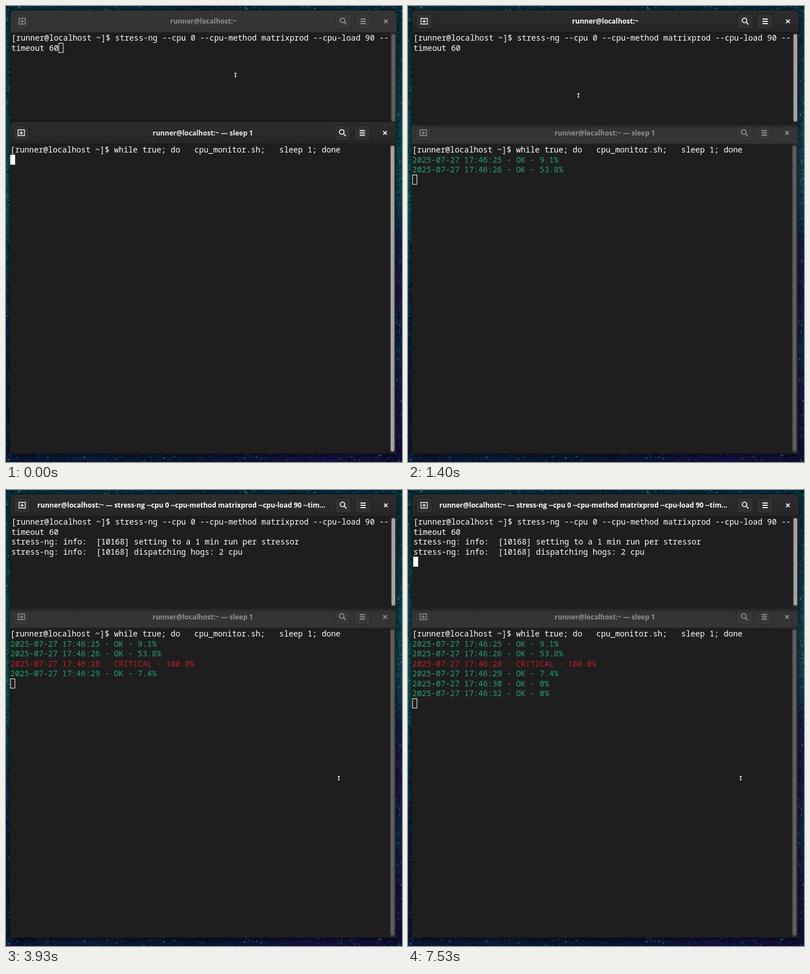
These frames come from a looping animation (698x803 px, 8 s). An HTML page with a canvas:

```html
<!DOCTYPE html>
<html lang="en">
<head>
<meta charset="utf-8">
<title>CPU monitor</title>
<style>
  html, body { margin: 0; width: 100%; height: 100%; overflow: hidden; background: #081428; }
  canvas { display: block; }
</style>
</head>
<body>
<canvas id="stage" width="698" height="803"></canvas>
<script>
const W = 698, H = 803, LOOP = 8000;
const ctx = document.getElementById('stage').getContext('2d');
const MONO = '13.87px "Noto Sans Mono", monospace';
const TITLE = 'bold 12px "Open Sans", sans-serif';
const CELL_W = 8.32, ROW_H = 17.5;
const WHITE = '#ffffff', GREEN = '#26a269', RED = '#c01c28';
const PROMPT = '[runner@localhost ~]$ ';
const HOME = 'runner@localhost:~';

const FOCUS_AT = 735, ENTER_AT = 2070, OUTPUT_AT = 2135, TITLE_AT = 2535;
const BLINKS = [1400, 2000, 2800, 3400, 3930, 4600, 5400, 6000, 7130, 7530];
const LOG = [
  [200, '25 - OK - 9.1%'],
  [1330, '26 - OK - 53.8%'],
  [2600, '28 - CRITICAL - 100.0%'],
  [3870, '29 - OK - 7.4%'],
  [5530, '30 - OK - 0%'],
  [7530, '32 - OK - 0%']
];
const POINTER = [
  [130, 404, 121], [700, 219, 87], [930, 219, 86], [1000, 219, 86],
  [1400, 300, 157], [2470, 300, 157], [2870, 586, 507]
];

const clamp = v => Math.max(0, Math.min(1, v));
const smooth = v => v * v * (3 - 2 * v);
const lerp = (a, b, p) => a + (b - a) * p;
const grey = (dim, lit, p) => {
  const v = Math.round(lerp(dim, lit, p));
  return `rgb(${v},${v},${v})`;
};

function random(seed) {
  return () => (seed = (seed * 16807) % 2147483647) / 2147483647;
}

function fillRound(c, x, y, w, h, r, color) {
  c.beginPath();
  c.roundRect(x, y, w, h, r);
  c.fillStyle = color;
  c.fill();
}

// Only the narrow margins around the windows are ever visible.
function makeWallpaper() {
  const layer = document.createElement('canvas');
  layer.width = W;
  layer.height = H;
  const c = layer.getContext('2d');
  const strip = (x, y, w, h, colors) => {
    const g = h > w ? c.createLinearGradient(0, 0, 0, H) : c.createLinearGradient(0, 0, W, 0);
    colors.forEach((color, i) => g.addColorStop(i / (colors.length - 1), color));
    c.fillStyle = g;
    c.fillRect(x, y, w, h);
  };
  strip(0, 0, 20, H, ['#08303c', '#083c44', '#0a525a', '#0c5c5c', '#0a3e4c', '#0a2444', '#0a1a38', '#0a1430']);
  strip(678, 0, 20, H, ['#082436', '#083440', '#0a4450', '#0e5058', '#10204a', '#1e1250', '#0c2844', '#180e44', '#0e0c30']);
  strip(0, 0, W, 10, ['#08303c', '#08283a', '#061c30', '#082438', '#082436']);
  strip(0, 787, W, 16, ['#0a1430', '#0a1c38', '#081630', '#0a1232', '#160e40', '#0e0c30']);

  const rnd = random(4177);
  for (let i = 0; i < 6000; i++) {
    const along = rnd(), side = rnd(), depth = rnd();
    let x, y;
    if (side < 0.28) { x = depth * 10; y = along * H; }
    else if (side < 0.56) { x = W - depth * 12; y = along * H; }
    else if (side < 0.76) { x = along * W; y = depth * 10; }
    else { x = along * W; y = H - depth * 16; }
    const pick = rnd(), bright = rnd() > 0.965;
    const hue = bright ? 150 + 25 * rnd() : y < 400 ? 170 + 35 * rnd() : pick < 0.45 ? 262 : 212;
    const light = bright ? 35 + 25 * rnd() : 3 + 20 * pick;
    c.fillStyle = `hsla(${hue},${bright ? 45 : 70}%,${light}%,.6)`;
    const size = 1 + rnd() * 2;
    c.fillRect(x, y, size, size);
  }
  return layer;
}
const wallpaper = makeWallpaper();

function strokePath(color, width, draw) {
  ctx.strokeStyle = color;
  ctx.lineWidth = width;
  ctx.beginPath();
  draw();
  ctx.stroke();
}

function drawButton(x, y, focus) {
  fillRound(ctx, x - 14.5, y - 14, 29, 28, 5, grey(40, 27, focus));
  fillRound(ctx, x - 13.5, y - 13, 27, 26, 4, grey(55, 49, focus));
}

function drawControls(y, dx, focus, icon) {
  const tab = 28.4 + dx, search = 594.5 + dx, menu = 629.5 + dx, close = 669.5 + dx;
  [tab, search, menu].forEach(x => drawButton(x, y, focus));
  strokePath(icon, 1.4, () => {
    ctx.moveTo(tab - 3, y + 4.8);
    ctx.lineTo(tab - 5.6, y + 4.8);
    ctx.lineTo(tab - 5.6, y - 5.2);
    ctx.lineTo(tab + 5.6, y - 5.2);
    ctx.lineTo(tab + 5.6, y + 4.8);
    ctx.lineTo(tab - 3, y + 4.8);
    ctx.moveTo(tab - 3.2, y);
    ctx.lineTo(tab + 3.2, y);
    ctx.moveTo(tab, y - 3.2);
    ctx.lineTo(tab, y + 3.2);
  });
  strokePath(icon, 1.8, () => {
    ctx.arc(search - 1.3, y - 1.6, 4, 0, Math.PI * 2);
    ctx.moveTo(search + 1.6, y + 1.4);
    ctx.lineTo(search + 5.8, y + 5.6);
  });
  strokePath(icon, 1.8, () => {
    for (const row of [-4, 0, 4]) {
      ctx.moveTo(menu - 4.6, y + row);
      ctx.lineTo(menu + 4.6, y + row);
    }
  });
  strokePath(icon, 1.9, () => {
    ctx.moveTo(close - 3.2, y - 3.2);
    ctx.lineTo(close + 3.2, y + 3.2);
    ctx.moveTo(close + 3.2, y - 3.2);
    ctx.lineTo(close - 3.2, y + 3.2);
  });
}

function drawWindow(win, focus, title, titleX, titleColor) {
  const { x, y, w, h, dx } = win;
  const mid = y + 19;
  const barFocus = clamp(focus * 3.5);
  ctx.save();
  ctx.shadowColor = 'rgba(0,0,0,.6)';
  ctx.shadowBlur = 9;
  ctx.shadowOffsetY = 2;
  fillRound(ctx, x - 0.5, y - 0.5, w + 1, h + 1, [8, 8, 1, 1], '#141414');
  ctx.restore();

  fillRound(ctx, x, y, w, h, [8, 8, 0, 0], '#1e1e1e');
  const bar = ctx.createLinearGradient(0, y, 0, y + 38);
  bar.addColorStop(0, grey(53, 45, barFocus));
  bar.addColorStop(1, grey(52, 38, barFocus));
  fillRound(ctx, x, y, w, 38, [8, 8, 0, 0], bar);
  ctx.fillStyle = grey(36, 18, barFocus);
  ctx.fillRect(x, y + 38, w, 1);

  drawControls(mid, dx, barFocus, grey(145, 238, focus));
  ctx.font = TITLE;
  ctx.textAlign = 'center';
  ctx.fillStyle = titleColor;
  ctx.fillText(title, titleX, mid + 4.2);

  const trough = x + w - 12;
  ctx.fillStyle = grey(44, 40, focus);
  ctx.fillRect(trough, y + 39, 12, h - 39);
  ctx.fillStyle = '#191919';
  ctx.fillRect(trough, y + 39, 1, h - 39);
  fillRound(ctx, trough + 3, y + 41.5, 6.5, h - 45, 3.2, grey(94, 164, focus));
}

function drawLine(win, row, text, color = WHITE) {
  ctx.font = MONO;
  ctx.textAlign = 'left';
  ctx.fillStyle = color;
  ctx.fillText(text, win.textX, win.textY + row * ROW_H + 13.7);
}

function drawCaret(win, row, col, focused) {
  const x = win.textX + col * CELL_W - 0.2, y = win.textY + row * ROW_H;
  if (focused) {
    ctx.fillStyle = WHITE;
    ctx.fillRect(x, y, 8.7, ROW_H);
  } else {
    strokePath(WHITE, 1, () => ctx.rect(x + 0.5, y + 0.5, 7.9, ROW_H - 1));
  }
}

const upper = { x: 8, y: 8, w: 680.5, h: 199, dx: 0, textX: 9.4, textY: 47.5 };
const lower = { x: 7, y: 204.5, w: 680, h: 583.5, dx: -1.4, textX: 7.6, textY: 244.5 };

function drawUpper(t, fade) {
  const active = t >= FOCUS_AT, running = t >= TITLE_AT;
  const title = running
    ? HOME + ' — stress-ng --cpu 0 --cpu-method matrixprod --cpu-load 90 --tim…'
    : HOME;
  drawWindow(upper, fade, title, running ? 309 : 348, active ? WHITE : grey(145, 255, 0));
  drawLine(upper, 0, PROMPT + 'stress-ng --cpu 0 --cpu-method matrixprod --cpu-load 90 --');
  drawLine(upper, 1, 'timeout 60');
  if (t >= OUTPUT_AT) {
    drawLine(upper, 2, 'stress-ng: info:  [10168] setting to a 1 min run per stressor');
    drawLine(upper, 3, 'stress-ng: info:  [10168] dispatching hogs: 2 cpu');
  }
  const shown = BLINKS.filter(at => t >= at).length % 2 === 0;
  if (!shown) return;
  if (t < ENTER_AT) drawCaret(upper, 1, 10, active);
  else drawCaret(upper, t < OUTPUT_AT ? 2 : 4, 0, true);
}

function drawLower(t, fade) {
  drawWindow(lower, 1 - fade, HOME + ' — sleep 1', 347, grey(145, 238, 1 - fade));
  drawLine(lower, 0, PROMPT + 'while true; do   cpu_monitor.sh;   sleep 1; done');
  const entries = LOG.filter(([at]) => t >= at);
  entries.forEach(([, text], i) =>
    drawLine(lower, i + 1, '2025-07-27 17:46:' + text, text.includes('CRITICAL') ? RED : GREEN));
  drawCaret(lower, entries.length + 1, 0, t < FOCUS_AT);
}

function drawPointer(t) {
  if (t >= ENTER_AT && t < 2470) return;
  let [, x, y] = POINTER[0];
  for (let i = 1; i < POINTER.length; i++) {
    const [t0, x0, y0] = POINTER[i - 1], [t1, x1, y1] = POINTER[i];
    if (t < t0) break;
    const p = smooth(clamp((t - t0) / (t1 - t0)));
    x = lerp(x0, x1, p);
    y = lerp(y0, y1, p);
  }
  x = Math.round(x) + 0.5;
  y = Math.round(y) + 0.5;
  const beam = () => {
    ctx.moveTo(x - 2, y - 3);
    ctx.lineTo(x + 2, y - 3);
    ctx.moveTo(x, y - 3);
    ctx.lineTo(x, y + 3);
    ctx.moveTo(x - 1.5, y + 3);
    ctx.lineTo(x + 1.5, y + 3);
  };
  strokePath('#0c0c0c', 3, beam);
  strokePath(WHITE, 1.3, beam);
}

function render(t) {
  const fade = smooth(clamp((t - FOCUS_AT) / 190));
  ctx.drawImage(wallpaper, 0, 0);
  if (t < FOCUS_AT) {
    drawUpper(t, fade);
    drawLower(t, fade);
  } else {
    drawLower(t, fade);
    drawUpper(t, fade);
  }
  drawPointer(t);
}

const start = performance.now();
function tick() {
  render((performance.now() - start) % LOOP);
  requestAnimationFrame(tick);
}
tick();
</script>
</body>
</html>
```
